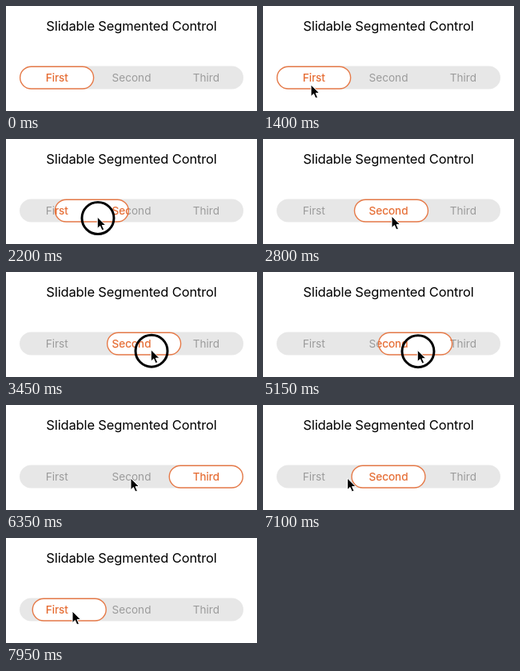
Animation, 314 px wide and 132 px high, one loop 8000 ms. Source, as an HTML page:

```html
<!DOCTYPE html>
<html lang="en">
<head>
<meta charset="utf-8">
<title>Slidable Segmented Control</title>
<style>
  html, body { margin: 0; width: 100%; height: 100%; overflow: hidden; background: #fff; }
  svg { display: block; width: 314px; height: 132px; }
  text { font-family: Inter, Roboto, sans-serif; text-anchor: middle; }
  .title { font-size: 16.5px; letter-spacing: -0.14px; fill: #000; }
  .labels { font-size: 13.6px; fill: #9b9b9b; }
  .active { fill: #e56a30; stroke: #e56a30; stroke-width: 0.2; }
  .track { fill: #e7e7e7; }
  .thumb { fill: #fff; stroke: #e67a48; stroke-width: 1.4; }
  .ring { fill: none; stroke: #000; stroke-width: 3; }
  .arrow { fill: #000; stroke: #fff; stroke-linejoin: round; }
</style>
</head>
<body>
<svg viewBox="0 0 314 132">
  <defs>
    <clipPath id="window"><rect id="hole" y="76" width="93.3" height="28.5" rx="14.2"/></clipPath>
  </defs>
  <text class="title" x="157" y="31">Slidable Segmented Control</text>
  <rect class="track" x="17" y="75.5" width="280" height="29" rx="14.5"/>
  <g class="labels" id="labels"></g>
  <rect class="thumb" id="thumb" y="76.2" width="92" height="27.8" rx="13.9"/>
  <g clip-path="url(#window)"><g class="labels active" id="lit"></g></g>
  <circle class="ring" id="ring"/>
  <path class="arrow" id="arrow" d="M0 0V14.6L3.4 11.5L5.8 17L8.4 15.9L6 10.6H10.6Z"/>
</svg>
<script>
  const LOOP = 8000, STEP = 50;
  const SETTLE = 410, LAG = 50, GROW = 100;
  const WIDTH = 280 / 3;
  const $ = id => document.getElementById(id);
  const slot = i => 17 + WIDTH * i;
  const clamp = (v, lo, hi) => Math.min(hi, Math.max(lo, v));
  const mix = (a, b, u) => a + (b - a) * u;
  const glide = u => (1 - Math.cos(Math.PI * u)) / 2;
  const brake = u => Math.sin(Math.PI / 2 * u);

  const enter = { x: 88, y: 131 };
  const moves = [
    { from: 850, to: 1400, x: 60, y: 99, ease: glide },
    { from: 1650, to: 2700, x: 161, y: 97, ease: glide },
    { from: 3150, to: 4560, x: 223, y: 99, ease: brake },
    { from: 4560, to: 5350, x: 188, y: 98, ease: glide },
    { from: 5350, to: 5800, x: 281, y: 96, ease: glide },
    { from: 5900, to: 6300, x: 156, y: 92, ease: glide },
    { from: 6850, to: 7250, x: 83, y: 92, ease: glide }
  ];
  // A press with a grip drags the thumb; the others are taps
  const presses = [
    { down: 1600, up: 2700, target: 1, grip: 46 },
    { down: 3050, up: 5850, target: 2, grip: 52 },
    { down: 6500, up: 6650, target: 1 },
    { down: 7500, up: 7650, target: 0 }
  ];

  function tip(t) {
    let { x, y } = enter;
    for (const m of moves) {
      const u = m.ease(clamp((t - m.from) / (m.to - m.from), 0, 1));
      x = mix(x, m.x, u);
      y = mix(y, m.y, u);
    }
    return { x, y };
  }

  function thumbLeft(t) {
    let left = slot(0);
    for (const p of presses) {
      if (t < p.down) break;
      if (p.grip) left = clamp(tip(Math.min(t, p.up) - LAG).x - p.grip, slot(0), slot(2));
      left = mix(left, slot(p.target), glide(clamp((t - p.up) / SETTLE, 0, 1)));
    }
    return left;
  }

  function place(el, attrs) {
    for (const name in attrs) el.setAttribute(name, attrs[name]);
  }

  function draw(t) {
    const left = thumbLeft(t);
    place($('thumb'), { x: left + 0.6 });
    place($('hole'), { x: left });

    const { x, y } = tip(t);
    $('arrow').style.display = t < 850 ? 'none' : '';
    place($('arrow'), { transform: `translate(${x} ${y})` });

    const press = presses.find(p => t >= p.down && t < p.up);
    $('ring').style.display = press ? '' : 'none';
    if (press) place($('ring'), { cx: x + 0.7, cy: y + 1.5, r: t < press.down + GROW ? 10.5 : 20 });
  }

  // Grey labels, and a lit copy seen only through the thumb
  for (const id of ['labels', 'lit']) {
    ['First', 'Second', 'Third'].forEach((name, i) => {
      const label = document.createElementNS('http://www.w3.org/2000/svg', 'text');
      label.textContent = name;
      place(label, { x: slot(i + 0.5), y: 95 });
      $(id).append(label);
    });
  }

  const start = performance.now();
  function tick() {
    const t = (performance.now() - start) % LOOP;
    draw(Math.floor(t / STEP) * STEP);
    requestAnimationFrame(tick);
  }
  draw(0);
  requestAnimationFrame(tick);
</script>
</body>
</html>
```
